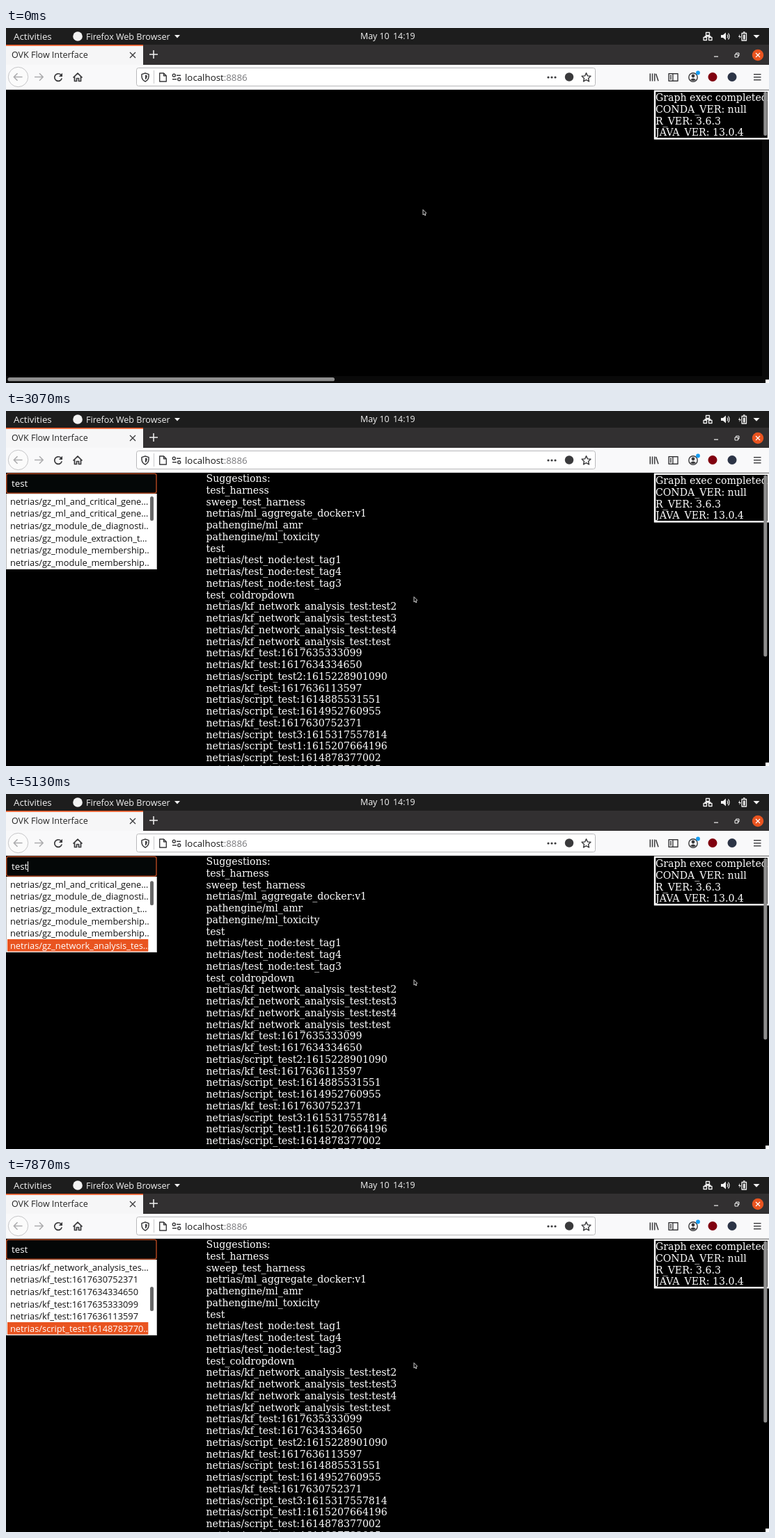
Recreate the animation shown at these times as an HTML page with a canvas. Size 1096 by 511 pixels, loop 8 s.

```html
<!DOCTYPE html>
<html lang="en">
<head>
<meta charset="utf-8">
<title>Browser search with suggestions</title>
<style>
html, body { margin: 0; width: 100%; height: 100%; overflow: hidden; background: #000; }
canvas { display: block; }
</style>
</head>
<body>
<canvas id="stage" width="1096" height="511"></canvas>
<script>
const ctx = document.getElementById('stage').getContext('2d');
const LOOP = 8000;
const UI = '"Open Sans", "Noto Sans", sans-serif';
const SERIF = '"DejaVu Serif", serif';
const ORANGE = '#e95420', INK = '#3a3a3c', PALE = '#f2f2f2';
const TAU = Math.PI * 2;
const LINE = 16.75, ROW = 17.6;

const suggestions = [
  'test_harness', 'sweep_test_harness', 'netrias/ml_aggregate_docker:v1',
  'pathengine/ml_amr', 'pathengine/ml_toxicity', 'test',
  ...[1, 4, 3].map(n => 'netrias/test_node:test_tag' + n),
  'test_coldropdown',
  ...[2, 3, 4, ''].map(n => 'netrias/kf_network_analysis_test:test' + n),
  ...['kf_test:1617635333099', 'kf_test:1617634334650', 'script_test2:1615228901090',
    'kf_test:1617636113597', 'script_test:1614885531551', 'script_test:1614952760955',
    'kf_test:1617630752371', 'script_test3:1615317557814', 'script_test1:1615207664196',
    'script_test:1614878377002', 'script_test:1614887782095'].map(s => 'netrias/' + s)
];
const repeat = (n, s) => Array(n).fill(s);
const options = [
  ...repeat(2, 'gz_ml_and_critical_gene…'), 'gz_module_de_diagnosti…', 'gz_module_extraction_t…',
  ...repeat(2, 'gz_module_membership…'), ...repeat(4, 'gz_network_analysis_tes…'),
  'gz_network_embedding…', 'kf_bug_test:1616683171…', ...repeat(4, 'kf_network_analysis_tes…'),
  'kf_test:1617630752371', 'kf_test:1617634334650', 'kf_test:1617635333099',
  'kf_test:1617636113597', 'script_test:16148783770…'
].map(s => 'netrias/' + s);
const env = ['Graph exec completed', 'CONDA_VER: null', 'R_VER: 3.6.3', 'JAVA_VER: 13.0.4'];

// Times in ms
const OPEN = 1870, POPUP = 2930, RESULTS = 3000, SCROLLBAR = 3070;
const keyTimes = [2600, 2670, 2800, 2870];
const blinkTimes = [1870, 3070, 4270, 5470, 6670, 7870];
const selectTimes = [4130, 4330, 4470, 4670, 4870, 5000, 5130, 5330, 5470, 5670, 5800,
  6000, 6130, 6330, 6530, 6730, 6930, 7130, 7400, 7670, 7870];
const passed = (times, t) => times.filter(x => x <= t).length;

function rect(x, y, w, h, color) {
  ctx.fillStyle = color;
  ctx.fillRect(x, y, w, h);
}
function pill(x, y, w, h, r, fill, stroke, width = 1) {
  ctx.beginPath();
  ctx.roundRect(x, y, w, h, r);
  paint(fill, stroke, width);
}
function paint(fill, stroke, width) {
  if (fill) { ctx.fillStyle = fill; ctx.fill(); }
  if (stroke) { ctx.strokeStyle = stroke; ctx.lineWidth = width; ctx.stroke(); }
}
function disc(x, y, r, fill, stroke, width = 1) {
  ctx.beginPath();
  ctx.arc(x, y, r, 0, TAU);
  paint(fill, stroke, width);
}
function shape(d, x, y, fill, stroke, width = 1.4) {
  ctx.save();
  ctx.translate(x, y);
  const path = new Path2D(d);
  if (fill) { ctx.fillStyle = fill; ctx.fill(path); }
  if (stroke) {
    ctx.strokeStyle = stroke;
    ctx.lineWidth = width;
    ctx.lineJoin = 'round';
    ctx.stroke(path);
  }
  ctx.restore();
}
function text(s, x, y, size, color, family = UI) {
  ctx.font = size + 'px ' + family;
  ctx.fillStyle = color;
  ctx.fillText(s, x, y);
}

function drawTopBar() {
  rect(0, 0, 1096, 24, '#1d1d1d');
  text('Activities', 11, 16.5, 13.3, PALE);
  disc(103, 12, 6.8, PALE);
  text('Firefox Web Browser', 115, 16.5, 12.55, PALE);
  shape('M-4-2H4L0 2.5Z', 246, 12, PALE);
  text('May 10', 509, 16, 12.4, PALE);
  text('14:19', 556, 16, 12.4, PALE);
  shape('M-2.5-5.5h5v4h-5zM-6 1.5h4.5v4H-6zM1.5 1.5H6v4H1.5zM0-1.5V0M-4 1.5V0H4v1.5', 1008, 12, null, PALE, 1.3);
  shape('M-6-2h3l4-3.5v11L-3 2h-3z', 1033, 12, PALE);
  shape('M3-2.5Q4.5 0 3 2.5M4.5-4.5Q7.5 0 4.5 4.5', 1033, 12, null, PALE, 1.2);
  shape('M-2-4.5H4.5V6H-2zM0-6.2h2.5', 1059, 12, null, PALE, 1.3);
  rect(1059, 9.5, 2.6, 7, PALE);
  shape('M-5-3L-7 1h2L-6 4l3-4h-2z', 1059, 12, PALE);
  shape('M-4.5-2h9L0 2.8Z', 1078, 12, PALE);
}

function drawTabs() {
  rect(0, 24, 1096, 29, '#323031');
  rect(0, 24, 197, 29, '#f6f6f7');
  rect(0, 24, 197, 1.7, ORANGE);
  text('OVK Flow Interface', 8, 43, 12.5, '#252525');
  shape('M-4-4L4 4M4-4L-4 4', 182, 39, null, INK, 1.3);
  shape('M-6 0H6M0-6V6', 212, 38, null, PALE, 1.5);
  rect(1017, 40.5, 6, 1.2, PALE);
  shape('M-3-1h4.5v4H-3zM-1.3-1v-2H3v4H1.5', 1050, 39, null, PALE, 1);
  disc(1080, 39, 8.2, ORANGE);
  shape('M-3-3L3 3M3-3L-3 3', 1080, 39, null, '#fff', 1.2);
}

function drawToolbar() {
  rect(0, 53, 1096, 36, '#f9f9fa');
  rect(0, 88, 1096, 1, '#cfcfd1');
  const leftArrow = 'M6 0H-6M-1-5.2L-6.2 0L-1 5.2';
  disc(17.5, 70.5, 14.2, '#fbfbfb', '#c6c6c8');
  shape(leftArrow, 17.5, 70.5, null, '#acacae', 1.6);
  shape('M-6 0H6M1-5.2L6.2 0L1 5.2', 47, 70.5, null, '#acacae', 1.6);
  shape('M3.9-3.6A5.3 5.3 0 1 0 5.2 1.4', 75, 71, null, INK, 1.7);
  shape('M6-6.2V-1H.8z', 75, 71, INK);
  shape('M-6.5 .5L0-5.8L6.5 .5M-4.5-1v6.5h3V1.5h3v4h3V-1', 103, 71, null, INK, 1.7);

  pill(187.5, 57.5, 659, 26, 3, '#fff', '#b9b9bb');
  shape('M0-6L5-4.4V-1Q4.5 4 0 6Q-4.5 4-5-1V-4.4z', 200, 71, null, INK, 1.5);
  shape('M0-3.5V3.3Q2.5 2 2.7-1V-2.7z', 200, 71, INK);
  rect(212, 61, 1, 19, '#c9c9cb');
  shape('M-4.8-6H1L4.8-2.2V6H-4.8zM1-6V-2.2H4.8', 225.5, 71, null, INK, 1.4);
  shape('M0-2.8H6M-6 2.8H0', 245, 71, null, INK, 1.5);
  disc(241.3, 68.2, 2, null, INK, 1.4);
  disc(248.7, 73.8, 2, null, INK, 1.4);
  text('localhost', 257, 75.5, 13.3, '#161616');
  const hostWidth = ctx.measureText('localhost').width;
  text(':8886', 257 + hostWidth, 75.5, 13.3, '#77777a');
  for (const x of [779, 784, 789]) disc(x, 71, 1.6, INK);
  disc(809, 70.5, 6.2, INK);
  shape('M0-6.3L1.9-2.1L6.4-1.7L3 1.4L4 6L0 3.6L-4 6L-3 1.4L-6.4-1.7L-1.9-2.1z', 833.5, 71, null, INK, 1.4);

  shape('M-5.7-5.5V5.5M-2.5-5.5V5.5M.7-5.5V5.5M2.6-5L6 5.3', 931, 71, null, INK, 1.5);
  shape('M-6.5-5.3h13V5.3h-13zM-.6-5.3V5.3M-4.8-2.3h2.3M-4.8 0h2.3M-4.8 2.3h2.3', 958.5, 71, null, INK, 1.4);
  disc(987, 71, 6.2, null, INK, 1.4);
  disc(987, 69, 2.4, INK);
  shape('M-4 3.7Q0-.8 4 3.7Q0 6.5-4 3.7z', 987, 71, INK);
  disc(994, 64.5, 2.9, '#149cf2');
  disc(1015, 70.5, 6.5, '#80000f');
  disc(1043, 70.5, 6.5, '#2c3446');
  for (const y of [66, 70, 74]) rect(1074, y, 10.5, 1.4, INK);
}

function drawStatusBox() {
  ctx.strokeStyle = '#fff';
  ctx.lineWidth = 2.4;
  ctx.strokeRect(932, 90.7, 163, 68.6);
  env.forEach((s, i) => text(s, 933, 105 + i * LINE, 14.12, '#fff', SERIF));
}

function drawField(t) {
  const typed = 'test'.slice(0, passed(keyTimes, t));
  pill(0.7, 90.2, 215.3, 28, 2.5, '#040707', '#a9441f', 1.5);
  text(typed, 8, 108.7, 13.3, '#fff');
  if (passed(blinkTimes, t) % 2) {
    const x = 8 + ctx.measureText(typed).width;
    rect(Math.round(x), 97, 1, 15, '#fff');
  }
}

function drawPopup(t) {
  const selected = passed(selectTimes, t) - 1;
  const first = Math.max(0, selected - 5);
  rect(0, 119, 217, 109, '#b9b9b9');
  rect(1, 119.5, 215, 108, '#fff');
  ctx.save();
  ctx.beginPath();
  ctx.rect(2, 120, 203, 108);
  ctx.clip();
  for (let i = 0; i < 6; i++) {
    const active = first + i === selected;
    if (active) rect(2, 121 + i * ROW, 202.3, ROW, ORANGE);
    text(options[first + i], 6, 134.8 + i * ROW, 12.83, active ? '#fff' : '#111');
  }
  ctx.restore();
  pill(207, 123 + first * 2.33, 5, 35, 2.5, '#686868');
}

function drawPage(t) {
  rect(0, 89, 1096, 422, '#000');
  drawStatusBox();
  if (t < OPEN) {
    rect(1086, 89, 10, 422, 'rgba(255,255,255,.035)');
    rect(0, 501, 1086, 10, 'rgba(255,255,255,.035)');
    pill(1088.3, 92, 5, 63, 2.5, '#8e8e8e');
    pill(2.5, 503, 469.5, 5.3, 2.6, '#8e8e8e');
  } else {
    text('Suggestions:', 287.5, 102, 14.12, '#fff', SERIF);
    if (t >= RESULTS) {
      suggestions.forEach((s, i) => text(s, 287.5, 102 + (i + 1) * LINE, 14.12, '#fff', SERIF));
    }
    drawField(t);
    if (t >= POPUP) drawPopup(t);
    if (t >= SCROLLBAR) pill(1088.3, 92.5, 5, 261, 2.5, '#8e8e8e');
  }
  rect(1091, 506, 5, 5, '#fff');
}

function drawPointer(t) {
  const step = t < 70 ? 0 : t < 130 ? 0.5 : 1;
  shape('M.5 .5V8L2.2 6.7L3.4 9L4.3 8.4L3.4 6.2L5.3 5.4z', 598.5 - 13 * step, 261 + 6 * step, '#000', '#e6e6e6', 0.9);
}

function frame(now) {
  const t = now % LOOP;
  drawTopBar();
  drawTabs();
  drawToolbar();
  drawPage(t);
  drawPointer(t);
}

let start;
function tick(now) {
  start ??= now;
  frame(now - start);
  requestAnimationFrame(tick);
}
requestAnimationFrame(tick);
</script>
</body>
</html>
```
